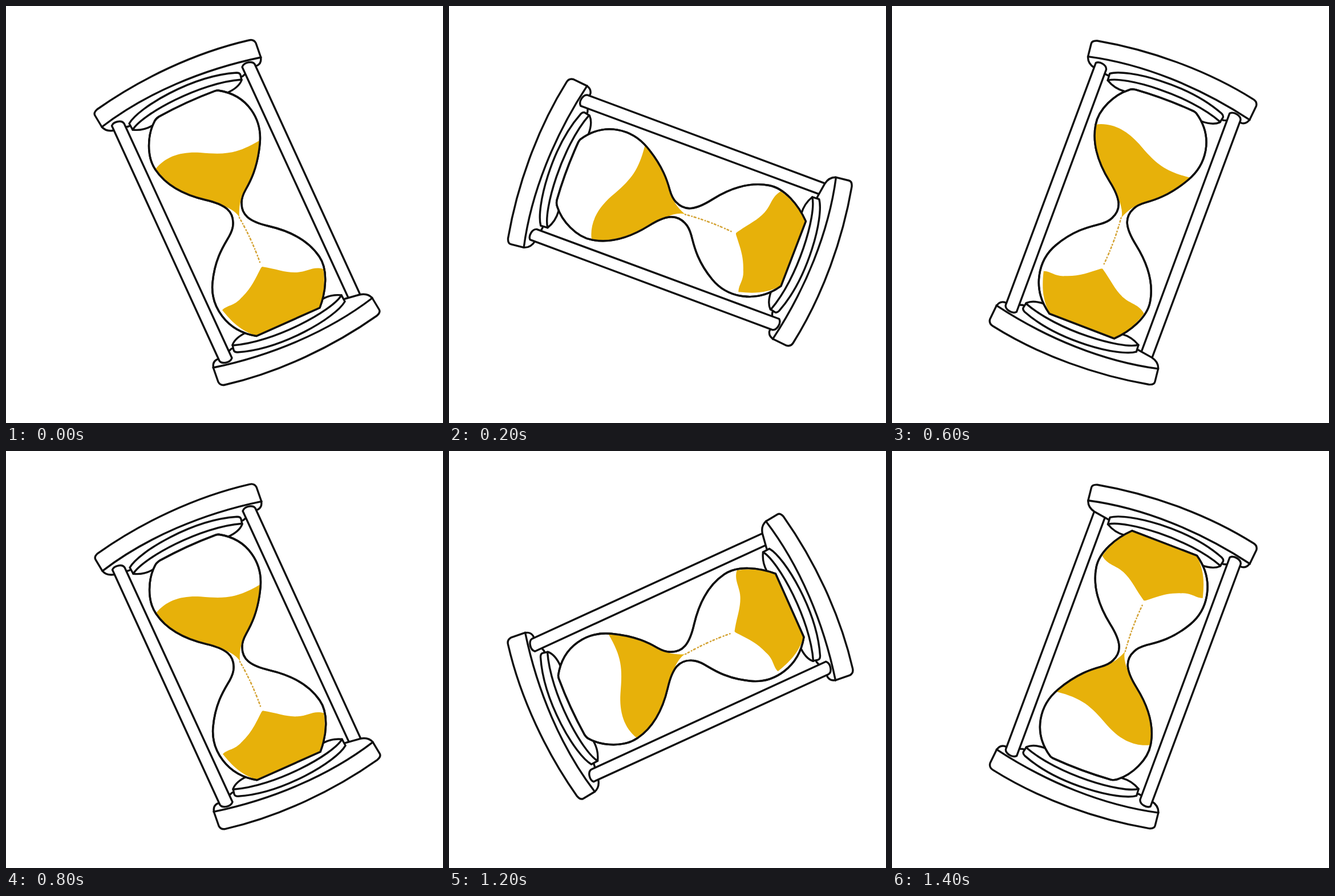
Write an HTML page that moves like this. It is 766x731 px and loops after 1600 ms.

```html
<!DOCTYPE html>
<html lang="en">
<head>
<meta charset="utf-8">
<title>Hourglass</title>
<style>
  html, body { margin: 0; width: 100%; height: 100%; overflow: hidden; background: #fff; }
  svg { display: block; width: 100%; height: 100%; }
  .line { fill: #fff; stroke: #0f0f0f; stroke-width: 3.4; stroke-linejoin: round; stroke-linecap: round; }
  .open { fill: none; }
  .sand { fill: #e7b10a; }
  .stream { fill: none; stroke: #d4a437; stroke-width: 2.6; stroke-linecap: round; stroke-dasharray: 1 4 2.5 4.5 .5 4 3 5; }
</style>
</head>
<body>
<svg viewBox="0 0 766 731">
  <g id="hourglass">
    <!-- one plate, disc and pillar; the other set is the same turned half round -->
    <g id="half" class="line">
      <path d="M168 212 L156 192 Q153 187 160 181 C235 128 330 82 426 60 Q434 58 438 65 L446 88
               Q449 99 441 104 L433 107 L415 123 L215 211 L190 218 Q176 221 168 212Z"/>
      <path class="open" d="M168 212 C245 153 345 111 447 90"/>
      <path d="M222 217 L216 206 C232 178 326 122 404 117 Q410 117 411 121 L413 130
               Q408 143 388 152 L256 210 Q240 219 222 217Z"/>
      <path class="open" d="M222 217 C238 190 340 134 413 129"/>
      <path d="M414 107 C417 98 432 96 436 102 L624.5 514 C622 521 608 525 603 518Z"/>
    </g>
    <use href="#half" transform="rotate(180 405 362)"/>

    <path id="glass" class="line" d="M372 148 C425 156 449 200 445 241 C441 284 428 308 420 322
      C415 331 413 337 413 344 C412 366 426 378 461 386 C491 393 528 408 549 439
      C565 462 561 500 550 529 L439 578.5 C386 570 358 526 362 485 C366 442 383 418 391 404
      C396 395 398 389 398 382 C399 360 385 348 350 340 C320 333 283 318 262 287
      C246 264 248 226 260 203 Q262 198 268 194 Q315 168 366 149 Q369 148 372 148Z"/>
    <path class="sand" d="M262 286 C280 263 308 255 340 257 C385 261 405 259 444 236
      C442 284 428 308 420 322 C411 337 408 350 409 370 C400 355 375 347 350 340
      C320 333 283 318 262 286Z"/>
    <path class="sand" d="M449 457 C475 461 490 468 510 467 C528 466 538 456 556 461
      C560 485 557 508 550 529 L439 578 C412 570 395 553 379 533
      C388 524 400 526 412 512 C430 495 436 480 447 459Z"/>
    <path class="stream" d="M409 371 Q431 409 446 452"/>
    <use href="#glass" style="fill-opacity:0"/>
  </g>
</svg>
<script>
  const STEP = 200, STEPS = 8;
  const hourglass = document.getElementById('hourglass');

  function draw(now) {
    const i = Math.floor(now / STEP) % STEPS;
    // quarter-step turns; the sand swaps ends at the fourth step and at the restart
    const angle = -45 * (i < 3 ? i : i - 4);
    const shift = i < 4 ? '0 0' : '1 -1.7';
    hourglass.setAttribute('transform', `translate(${shift}) rotate(${angle} 404.7 362.2)`);
    requestAnimationFrame(draw);
  }
  draw(0);
</script>
</body>
</html>
```
